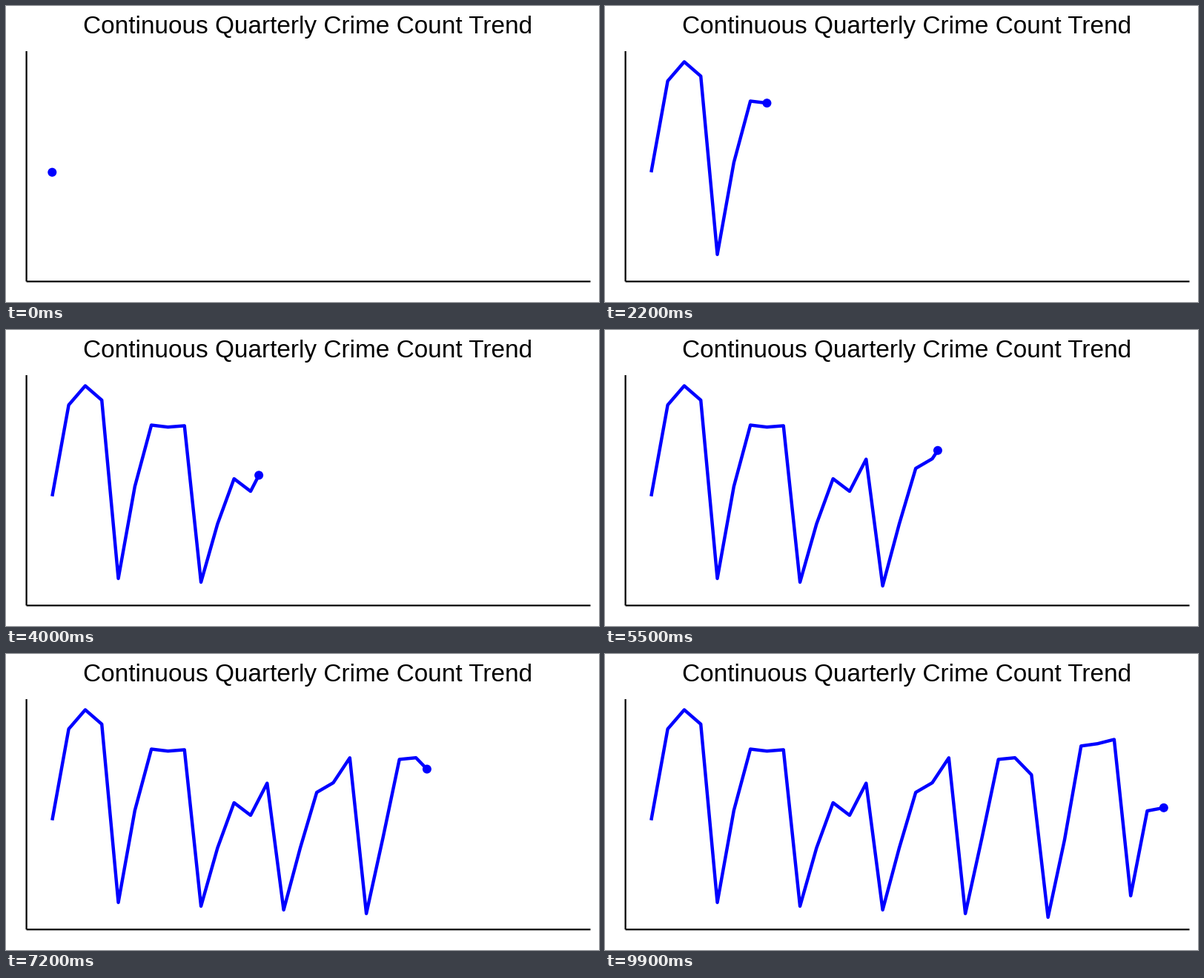
Write a matplotlib script that moves like this. It is 800 px wide and 400 px high and loops after 10 s.

```python
import numpy as np
import matplotlib.pyplot as plt
from matplotlib.animation import FuncAnimation
from matplotlib.patches import Circle

W, H, DPI = 800, 400, 100
FRAMES, INTERVAL = 100, 100
BLUE = "#0000ff"


def pt(px):
    """Pixels to points."""
    return px * 72 / DPI


def cycle(i, crest):
    """A dip that deepens each time, one climbing quarter, then a crest."""
    low = 335.8 + 5 * i
    climb = low + (0.6 - 0.037 * i) * (crest[0] - low)
    return [low, climb, *crest]


# Heights on the stage: opening crest, five cycles, closing rise
crests = [(128.5, 131.2, 129.4), (201, 218, 174.6), (187, 174, 140.3),
          (142.4, 140.2, 163.2), (124.3, 121.2, 115.5)]
ys = [224.7, 101.3, 75.4, 94.8]
for i, crest in enumerate(crests):
    ys += cycle(i, crest)
ys = np.array(ys + [326.7, 212, 207.8])
xs = np.linspace(62.3, 753.8, len(ys))

# Each quarter is reached on a whole frame
keys = np.round(np.linspace(0, FRAMES - 1, len(ys)))

fig = plt.figure(figsize=(W / DPI, H / DPI), dpi=DPI, facecolor="white")
ax = fig.add_axes([0, 0, 1, 1])
ax.set(xlim=(0, W), ylim=(H, 0))
ax.axis("off")

axis_style = dict(color="black", lw=pt(2.2), solid_capstyle="butt", snap=False)
ax.plot([27.6, 27.6], [61, 372.3], **axis_style)
ax.plot([27.6, 788.5], [372.3, 372.3], **axis_style)
ax.text(407.4, 36.8, "Continuous Quarterly Crime Count Trend", ha="center",
        va="baseline", family="Liberation Sans", size=24.05, color="black")

trend, = ax.plot([], [], color=BLUE, lw=pt(4.45), solid_capstyle="butt",
                 solid_joinstyle="round")
dot = ax.add_patch(Circle((xs[0], ys[0]), 6, fc=BLUE, ec="none", zorder=3))


def update(i):
    x, y = np.interp(i, keys, xs), np.interp(i, keys, ys)
    done = keys < i
    trend.set_data(np.append(xs[done], x), np.append(ys[done], y))
    dot.center = x, y
    return trend, dot


anim = FuncAnimation(fig, update, frames=FRAMES, interval=INTERVAL,
                     repeat=True, repeat_delay=0)
plt.show()
```
